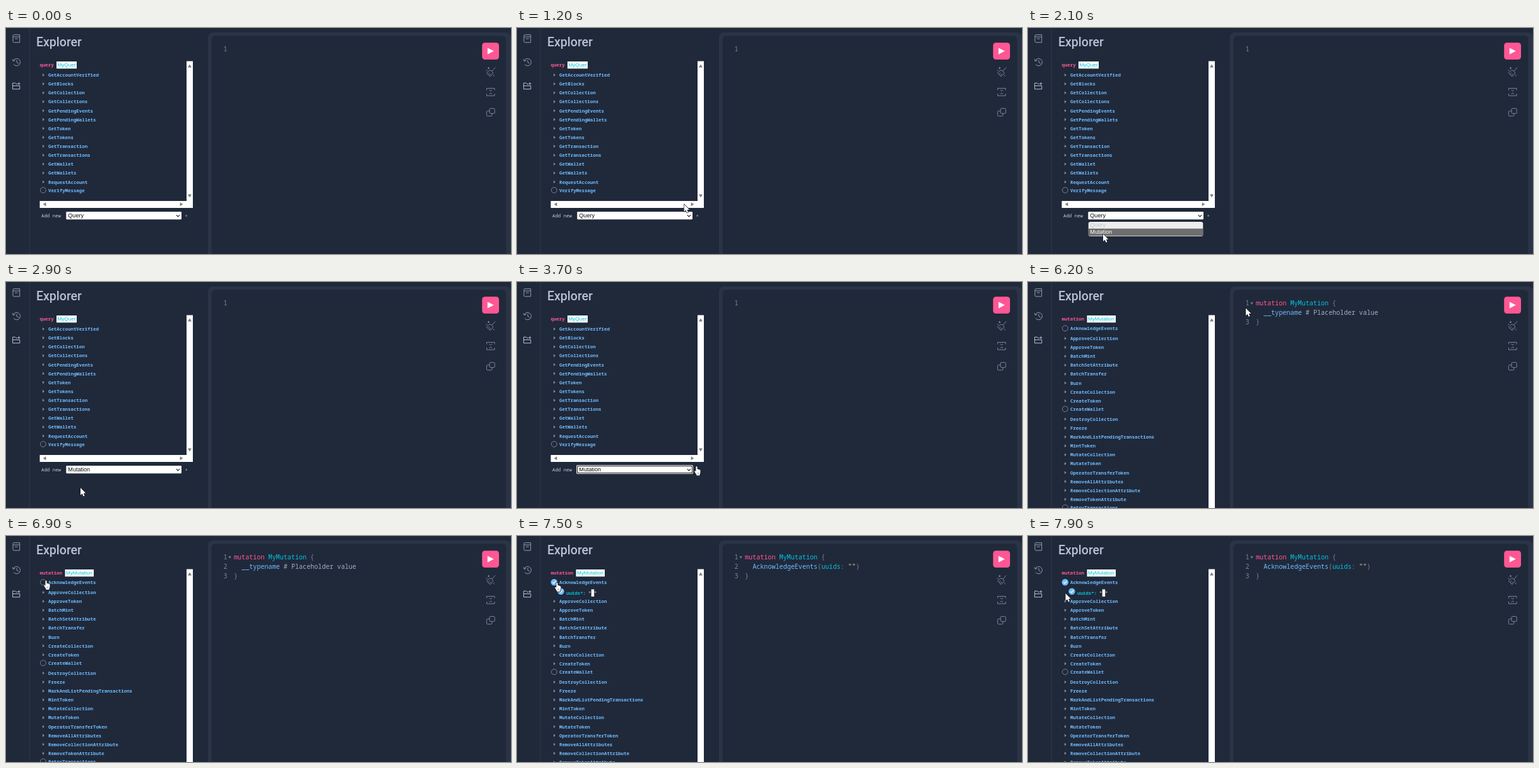
Write an HTML page with a canvas that moves like this. It is 800 px wide and 358 px high and loops after 8 s.

```html
<!DOCTYPE html>
<html lang="en">
<head>
<meta charset="utf-8">
<title>Explorer</title>
<style>
  html, body { margin: 0; width: 800px; height: 358px; overflow: hidden; background: #20293a; }
  canvas { display: block; width: 800px; height: 358px; }
</style>
</head>
<body>
<canvas id="stage"></canvas>
<script>
const W = 800, H = 358, LOOP = 8000;
const canvas = document.getElementById('stage');
const ctx = canvas.getContext('2d');
const ratio = window.devicePixelRatio || 1;
canvas.width = W * ratio;
canvas.height = H * ratio;

const C = {
  base: '#20293a', panel: '#2b3446', text: '#b7c2d7', icon: '#929db3', dim: '#7b869c',
  pink: '#ff5794', blue: '#70bcff', cyan: '#00c2e0', peach: '#ffcc99', white: '#ffffff'
};
const MONO = '"Noto Sans Mono", "DejaVu Sans Mono", monospace';
const ARIAL = '"Liberation Sans", Arial, sans-serif';
const F = {
  title: '500 19.5px Roboto, sans-serif',
  tree: '600 7.4px ' + MONO,
  label: '500 7.4px ' + MONO,
  code: '10.1px ' + MONO,
  input: '8.08px ' + ARIAL,
  select: '9.1px ' + ARIAL
};

// A leading "o" marks a field with a checkbox instead of an arrow.
const QUERIES = ('GetAccountVerified GetBlocks GetCollection GetCollections GetPendingEvents ' +
  'GetPendingWallets GetToken GetTokens GetTransaction GetTransactions GetWallet GetWallets ' +
  'RequestAccount oVerifyMessage').split(' ');
const MUTATIONS = ('oAcknowledgeEvents ApproveCollection ApproveToken BatchMint BatchSetAttribute ' +
  'BatchTransfer Burn CreateCollection CreateToken oCreateWallet DestroyCollection Freeze ' +
  'MarkAndListPendingTransactions MintToken MutateCollection MutateToken OperatorTransferToken ' +
  'RemoveAllAttributes RemoveCollectionAttribute RemoveTokenAttribute oRetryTransactions').split(' ');

const T = { open: 1450, pick: 2400, ring: 3300, blur: 3900, swap: 5300, check: 7300 };

// time, left, top of the pointer
const PATH = [
  [100, 789, 15], [950, 286, 247], [1350, 255, 294], [1500, 240, 297], [1800, 120, 315],
  [2050, 119, 326], [2300, 119, 328], [2600, 118, 326], [3200, 118, 326], [3600, 281, 291.5],
  [3750, 281, 291.5], [4050, 280, 295], [4400, 285, 301], [4700, 285, 301], [4800, 284, 298.5],
  [5400, 284, 298.5], [6100, 345, 41.5], [6300, 345, 41.5], [6800, 60, 70], [7400, 60, 70],
  [7800, 59.5, 91]
];
const HAND = [[3500, 5500], [6700, 7550]];

function text(s, x, y, font, color) {
  ctx.font = font;
  ctx.fillStyle = color;
  ctx.fillText(s, x, y);
}

function rect(x, y, w, h, color, r = 0) {
  ctx.fillStyle = color;
  ctx.beginPath();
  ctx.roundRect(x, y, w, h, r);
  ctx.fill();
}

function poly(points, color) {
  ctx.fillStyle = color;
  ctx.beginPath();
  points.forEach(([x, y]) => ctx.lineTo(x, y));
  ctx.closePath();
  ctx.fill();
}

function line(d, color, width = 1) {
  ctx.strokeStyle = color;
  ctx.lineWidth = width;
  ctx.stroke(new Path2D(d));
}

function arrow(x, y, angle, size, color, depth = 0.8) {
  const d = size * depth;
  ctx.save();
  ctx.translate(x, y);
  ctx.rotate(angle);
  poly([[-size, d], [0, -d], [size, d]], color);
  ctx.restore();
}

function runs(parts, x, y, font) {
  for (const [s, color] of parts) {
    text(s, x, y, font, color);
    x += ctx.measureText(s).width;
  }
}

function drawSidebar() {
  rect(36.6, 0, 1, H, '#30394b');
  line('M12.5 10.7H21.7V22.9H12.5Q11 22.9 11 21.4V12.2Q11 10.7 12.5 10.7M11 14H21.7M14 17H18.7', C.icon);
  line('M11.6 51.8A5.7 5.7 0 1 1 12.3 57.6M10.3 49.3L11.3 52.4L14.4 51.6M17 50.8V54.4L20 56', C.icon);
  line('M10.6 96.8V87.2H14.6L16 88.8H18M10.6 96.8H21.8V91.6H10.6M20.4 86.2V90.2M18.4 88.2H22.4', C.text);
  text('Explorer', 48, 28.7, F.title, C.text);
}

function drawPanel() {
  rect(320, 7, 480, 400, C.panel, 8);
  rect(325.7, 12.3, 466.5, 400, C.base, 6);
  rect(754.2, 23.2, 26.8, 26.8, C.pink, 4.5);
  poly([[762.8, 31.4], [772.8, 36.6], [762.8, 41.8]], C.white);
  // prettify
  line('M775.2 62.3L769.8 68.2M765.6 67.3Q770.6 66.4 771.6 72.2M765.6 67.3L761.2 71.2L766.8 76.8L771.6 72.2' +
    'M763.6 73.4L766.2 70.8M765.8 75.4L768.4 72.6' +
    'M764.5 61.8V65.2M762.8 63.5H766.2M760.4 67.2H762.4M772.8 74.2V76.4', C.dim);
  // merge
  line('M761.5 98.5V95.5H774V98.5M761.5 104V107.3H774V104M765.5 97.8L767.7 100L770 97.8' +
    'M765.5 105L767.7 102.8L770 105', C.dim);
  // copy
  line('M767.4 127.4H772.8Q774.2 127.4 774.2 128.8V134Q774.2 135.4 772.8 135.4H767.4Q766 135.4 766 134' +
    'V128.8Q766 127.4 767.4 127.4M766 131.4H762.8Q761.4 131.4 761.4 132.8V138.2Q761.4 139.6 762.8 139.6' +
    'H768.4Q769.8 139.6 769.8 138.2V135.4', C.dim);
}

function drawCode(swapped, checked) {
  const row = i => 37.2 + 15 * i;
  const count = swapped ? 3 : 1;
  for (let i = 0; i < count; i++) text(String(i + 1), 344.5, row(i), F.code, C.dim);
  if (!swapped) return;
  arrow(354.5, 34, Math.PI, 2.1, C.dim);
  runs([['mutation ', C.pink], ['MyMutation ', C.cyan], ['{', C.dim]], 361, row(0), F.code);
  runs(checked
    ? [['AcknowledgeEvents', C.blue], ['(', C.dim], ['uuids', C.cyan], [': ', C.dim], ['""', C.peach], [')', C.dim]]
    : [['__typename', C.blue], [' # Placeholder value', '#a3aec3']], 373.2, row(1), F.code);
  text('}', 361, row(2), F.code, C.dim);
}

function checkbox(x, y, on) {
  ctx.beginPath();
  ctx.arc(x, y, on ? 5.2 : 4.4, 0, Math.PI * 2);
  if (on) {
    ctx.fillStyle = C.blue;
    ctx.fill();
    line(`M${x - 2.5} ${y + 0.1}L${x - 0.7} ${y + 1.9}L${x + 2.6} ${y - 1.8}`, C.white, 1.2);
  } else {
    ctx.strokeStyle = '#8d97aa';
    ctx.lineWidth = 0.8;
    ctx.stroke();
  }
}

function drawArgument(y) {
  checkbox(69.5, y - 2.3, true);
  text('uuids*:', 78, y + 2.7, F.tree, C.cyan);
  text('"', 113, y + 2.7, F.tree, C.peach);
  rect(117.7, y - 5.5, 4.5, 11.5, C.white);
  text('"', 122, y + 2.7, F.tree, C.peach);
}

function drawTree(swapped, checked) {
  ctx.save();
  ctx.beginPath();
  ctx.rect(50, 50, 236, swapped ? H : 224);
  ctx.clip();
  text(swapped ? 'mutation' : 'query', 53.5, 61.2, F.tree, C.pink);
  const [x, w] = swapped ? [93.5, 45.5] : [80, 32];
  rect(x, 53, w, 11.3, C.white);
  ctx.save();
  ctx.beginPath();
  ctx.rect(x, 53, w - 1.2, 11.3);
  ctx.clip();
  text(swapped ? 'MyMutation' : 'MyQuery', x + 1.6, 61.4, F.input, C.cyan);
  ctx.restore();

  let y = 74.4;
  (swapped ? MUTATIONS : QUERIES).forEach((item, i) => {
    const leaf = item[0] === 'o';
    const mid = leaf ? y - 1.1 : y;
    if (leaf) checkbox(58.8, mid, checked && i === 0);
    else arrow(59.4, mid, Math.PI / 2, 2.4, '#858fa1', 0.6);
    text(leaf ? item.slice(1) : item, 67, mid + 2.7, F.tree, C.blue);
    y += leaf ? 14.9 : 14.12;
    if (checked && i === 0) {
      drawArgument(90);
      y += 14.12;
    }
  });
  ctx.restore();
}

function drawScrollbars(swapped) {
  const grey = '#7f7f7f';
  rect(286, 52.6, 10, swapped ? H : 232.4, C.white);
  arrow(291, 60, 0, 3, grey);
  if (swapped) return;
  rect(53.5, 274, 242.5, 11, C.white);
  arrow(291, 266, Math.PI, 3, grey);
  arrow(61, 279.2, -Math.PI / 2, 3, grey);
  arrow(278, 279.2, Math.PI / 2, 3, grey);
}

function drawForm(t) {
  text('Add new', 56, 300, F.label, '#c3cada');
  text('+', 283.6, 300, F.label, t > 4000 ? C.blue : '#c3cada');
  if (t >= T.ring && t < T.blur) {
    rect(94, 290, 185, 14, C.white, 2);
    rect(95, 291, 183, 12, '#101010', 1.5);
    rect(96, 292, 181, 10, C.white, 1);
  } else {
    rect(95.3, 291, 182.7, 12.2, C.white, 1.2);
  }
  text(t < T.pick ? 'Query' : 'Mutation', 98.3, 300.4, F.select, '#111111');
  line('M269.8 296.2L272.4 298.8L275 296.2', '#222222', 1.2);

  if (t < T.open || t >= T.pick) return;
  ctx.save();
  ctx.beginPath();
  ctx.roundRect(95.5, 307, 182, 23, 3.5);
  ctx.clip();
  rect(95.5, 307, 182, 23, '#ededed');
  rect(95.5, 317.8, 182, 11.4, '#6e6e6e');
  ctx.restore();
  text('Query', 98.3, 315.4, F.select, '#c5c8ce');
  text('Mutation', 98.3, 326.4, F.select, C.white);
}

const ARROW = new Path2D('M0 0V11.8L2.7 9.3L4.5 13.5L6.5 12.6L4.8 8.6H8.4Z');
const FIST = new Path2D('M2.4 1.3Q3.5 -.2 4.6 1.3V5Q5.7 4.4 6.3 5.4Q7.4 4.9 7.9 5.9Q9.2 5.6 9.5 7V10' +
  'Q9.2 12.5 8.4 13.4V15H3.4V13.8Q1.6 11.5 .3 9Q-.2 7.6 1 7.5Q1.8 7.7 2.4 8.7Z');

function drawPointer(t) {
  if (t < PATH[0][0]) return;
  let i = 0;
  while (i < PATH.length - 2 && t >= PATH[i + 1][0]) i++;
  const [t0, x0, y0] = PATH[i], [t1, x1, y1] = PATH[i + 1];
  const p = Math.min(1, (t - t0) / (t1 - t0));
  const e = p * p * (3 - 2 * p);
  const hand = HAND.some(([a, b]) => t >= a && t < b);
  const shape = hand ? FIST : ARROW;
  ctx.save();
  ctx.translate(x0 + (x1 - x0) * e, y0 + (y1 - y0) * e);
  ctx.lineJoin = 'round';
  ctx.strokeStyle = '#10141d';
  ctx.lineWidth = 1.2;
  ctx.stroke(shape);
  ctx.fillStyle = C.white;
  ctx.fill(shape);
  if (hand) line('M5 10V13M6.7 10V13', '#555b66', 0.5);
  ctx.restore();
}

function draw(t) {
  const swapped = t >= T.swap, checked = t >= T.check;
  ctx.setTransform(ratio, 0, 0, ratio, 0, 0);
  rect(0, 0, W, H, C.base);
  drawSidebar();
  drawPanel();
  drawCode(swapped, checked);
  drawTree(swapped, checked);
  drawScrollbars(swapped);
  if (!swapped) drawForm(t);
  drawPointer(t);
}

const start = performance.now();
function tick() {
  draw((performance.now() - start) % LOOP);
  requestAnimationFrame(tick);
}
tick();
</script>
</body>
</html>
```
